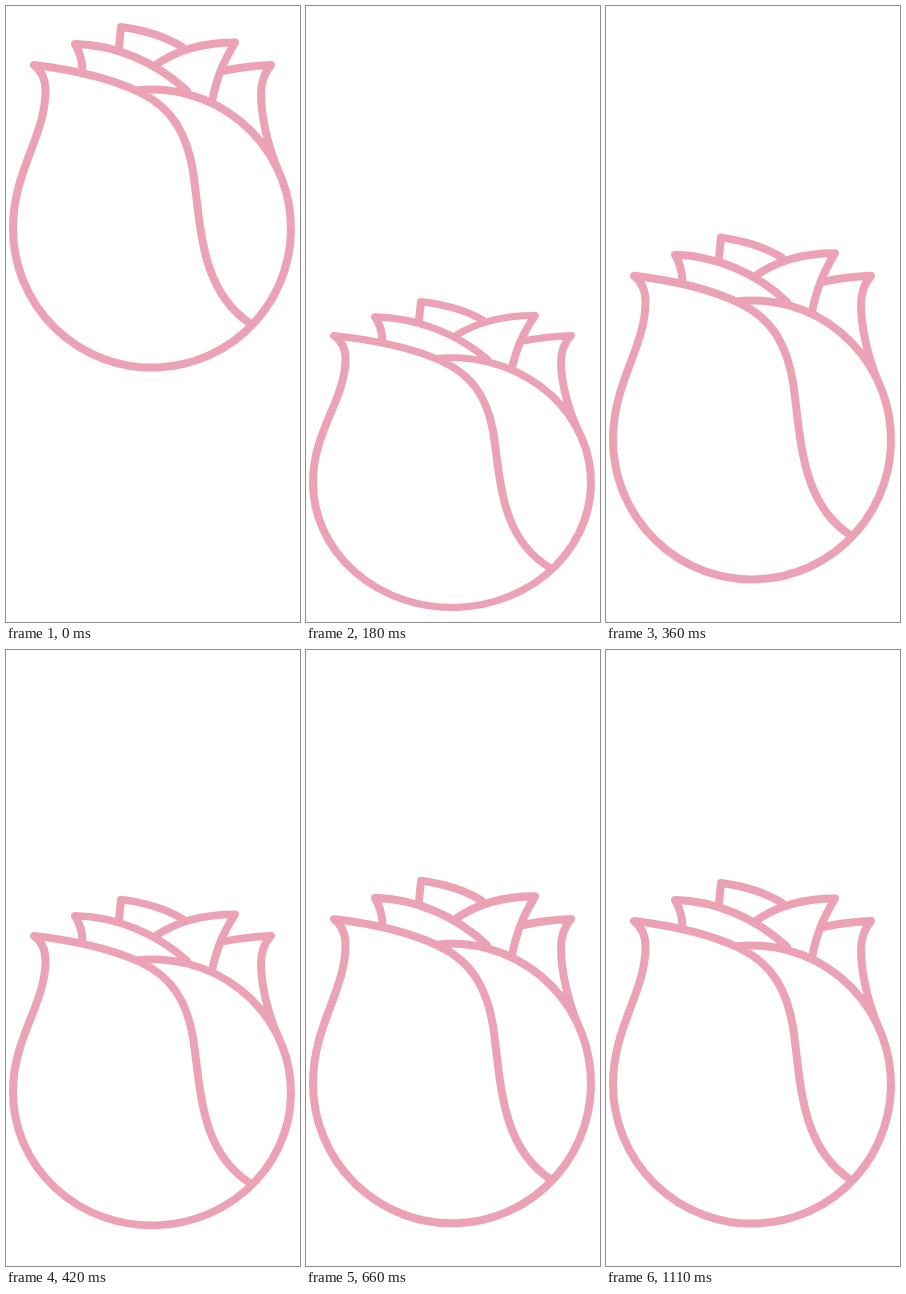
Write an HTML page with a canvas that moves like this. It is 294 px wide and 616 px high and loops after 1350 ms.

```html
<!DOCTYPE html>
<html lang="en">
<head>
<meta charset="utf-8">
<title>Bouncing rose</title>
<style>
  html, body { margin: 0; width: 100%; height: 100%; overflow: hidden; background: #fff; }
  canvas { display: block; width: 294px; height: 616px; }
</style>
</head>
<body>
<canvas id="stage"></canvas>
<script>
const W = 294, H = 616, LOOP = 1350, STEP = 30;
const REST_Y = 212;

const canvas = document.getElementById('stage');
const ctx = canvas.getContext('2d');
const dpr = window.devicePixelRatio || 1;
canvas.width = W * dpr;
canvas.height = H * dpr;

const rose = new Path2D([
  // bulb: right petal edge, round base, left side
  'M130 84.5 A139 139 0 1 1 7 222',
  'C7 165 39.5 130 39.5 85 C39.5 73 36 65 28 59',
  // front petal
  'C69 64 104 72 133 86 C167 102 181 129 187 165 C195 220 194 285 245 318',
  // right outer petal
  'M217 65 Q240 60 265 59 C258 67 255 76 255 88 C255 110 262 141 272 164',
  // inner petals
  'M149 59.5 C171 43.5 198 36.5 229 36.5 C218 55 211 70 206 95',
  'M76.5 64 Q76 50 69 38 C110 39 150 56 181 85',
  'M113 41 L115 21 C138 24 160 31 176 41'
].join(' '));

// Keys are [time, value, skew]; skew bends the ease leading to that key.
const drop = [[0, -212], [180, 23.5, 0.82], [290, 0]];
const stretch = [
  [0, 1], [180, 0.898, 1.08], [290, 1.063], [420, 0.957],
  [555, 1.013], [770, 0.998], [1080, 1]
];

function valueAt(keys, t) {
  const i = keys.findIndex(k => k[0] > t);
  if (i < 0) return keys[keys.length - 1][1];
  const [t0, a] = keys[i - 1];
  const [t1, b, skew = 1] = keys[i];
  const u = Math.pow((t - t0) / (t1 - t0), skew);
  return a + (b - a) * (1 - Math.cos(Math.PI * u)) / 2;
}

function draw(t) {
  ctx.setTransform(dpr, 0, 0, dpr, 0, 0);
  ctx.fillStyle = '#fff';
  ctx.fillRect(0, 0, W, H);

  // squash and stretch from the foot of the stage
  ctx.translate(0, H + valueAt(drop, t));
  ctx.scale(1, valueAt(stretch, t));
  ctx.translate(0, REST_Y - H);

  ctx.strokeStyle = '#eca2b5';
  ctx.lineWidth = 8;
  ctx.lineCap = ctx.lineJoin = 'round';
  ctx.stroke(rose);
}

const start = performance.now();

function tick() {
  const t = (performance.now() - start) % LOOP;
  draw(Math.floor(t / STEP) * STEP);
  requestAnimationFrame(tick);
}
tick();
</script>
</body>
</html>
```
